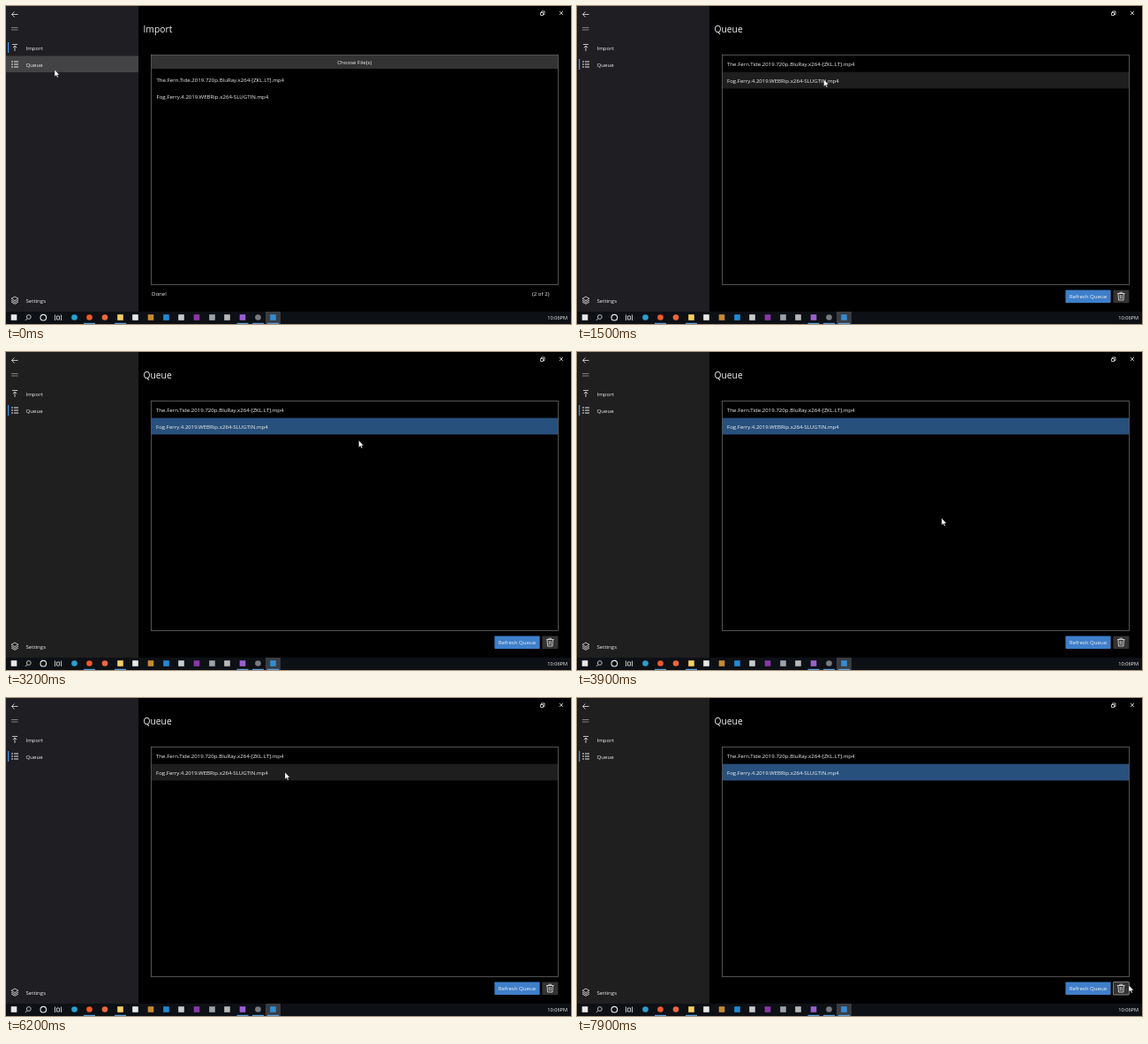
These frames come from a looping animation (640 by 360 pixels, 8000 ms). An HTML page:

```html
<!DOCTYPE html>
<html lang="en">
<head>
<meta charset="utf-8">
<title>Queue</title>
<style>
html, body { margin: 0; width: 100%; height: 100%; overflow: hidden; background: #000; }
svg { display: block; width: 640px; height: 360px; }
text { font: 6.1px "Open Sans", "Noto Sans", sans-serif; fill: #f2f2f2; }
.title { font-size: 10.3px; }
.mid { text-anchor: middle; }
.line { fill: none; stroke: #e8e8e8; stroke-width: .8; }
</style>
</head>
<body>
<svg viewBox="0 0 640 360">
  <rect width="640" height="360"/>

  <!-- sidebar -->
  <rect id="side" width="150" height="346"/>
  <rect id="navHover" y="56.5" width="150" height="18.5"/>
  <rect id="mark" x="2" width="1.2" height="12" fill="#4a8fe0"/>
  <path class="line" d="M13.500 9.500H6.500M9.500 6.500L6.500 9.500L9.500 12.500"/>
  <path class="line" stroke-opacity=".6" d="M6 24.500H13.500M6 27H13.500"/>
  <path class="line" d="M7 43.500H13M10 51V45M7.800 47.200L10 45L12.200 47.200"/>
  <path class="line" d="M6 63H8M6 66H8M6 69H8M9 63H14M9 66H14M9 69H14" style="stroke-width:1.2"/>
  <path class="line" d="M10 329L14 331.300L10 333.600L6 331.300ZM6 333.200L10 335.500L14 333.200M6 335L10 337.300L14 335"/>
  <text x="22.500" y="49.700">Import</text>
  <text x="22.500" y="68.700">Queue</text>
  <text x="22.500" y="335.500">Settings</text>

  <!-- window buttons -->
  <path class="line" d="M605.500 7.500H608.500V10.500H605.500ZM606.500 7.500V6H610V9.500H608.500M627 6L631 10M631 6L627 10"/>

  <g id="importPage">
    <text class="title" x="155.500" y="29.700">Import</text>
    <rect x="165" y="56" width="460" height="15" fill="#333"/>
    <rect class="line" x="164.500" y="55.500" width="461" height="260" style="stroke:#666"/>
    <text class="mid" x="394.700" y="65.700">Choose File(s)</text>
    <text class="file0" x="170.500" y="86"></text>
    <text class="file1" x="170.500" y="104.600"></text>
    <text x="165" y="327.800">Done!</text>
    <text x="615.500" y="327.800" text-anchor="end">(2 of 2)</text>
  </g>

  <g id="queuePage">
    <text class="title" x="155.500" y="29.700">Queue</text>
    <rect id="row0" x="165" y="56" width="460" height="18.700"/>
    <rect id="row1" x="165" y="74.700" width="460" height="18.700"/>
    <rect class="line" x="164.500" y="55.500" width="461" height="260" style="stroke:#666"/>
    <text class="file0" x="170" y="68.200"></text>
    <text class="file1" id="second" x="170" y="87"></text>
    <rect id="refresh" x="553.400" y="321.400" width="51.200" height="14.600" rx=".8" fill="#3f7fca"/>
    <text class="mid" x="579" y="331">Refresh Queue</text>
    <rect id="trash" x="607.400" y="321.400" width="18" height="14.600" rx=".8" fill="#333"/>
    <path class="line" d="M612 325.500H620.500M614.800 325.500V324.200H617.700V325.500M613 325.500L613.500 333H619L619.500 325.500M615.300 327V331.500M617.200 327V331.500"/>
  </g>

  <!-- taskbar -->
  <rect y="346" width="640" height="14" fill="#0d1015"/>
  <g id="bar"></g>
  <circle class="line" cx="25.800" cy="352" r="2.400"/>
  <path class="line" d="M24 353.800L21.800 356"/>
  <circle class="line" cx="42.300" cy="352.700" r="3.300" style="stroke-width:1.100"/>
  <path class="line" d="M55.500 349.500V356M57.500 351H60.500V355H57.500ZM62.500 349.500V356"/>
  <text x="636" y="354.800" text-anchor="end" style="font-size:5.600px">10:06PM</text>

  <path id="cursor" d="M0 0V8L1.800 6.300L3 9L4.300 8.400L3.100 5.900H5.500Z" fill="#fff" stroke="#111" stroke-width=".4"/>
</svg>
<script>
const el = id => document.getElementById(id);
const paint = (id, attrs) => {
  for (const name in attrs) el(id).setAttribute(name, attrs[name]);
};

const files = [
  "The.Fern.Tide.2019.720p.BluRay.x264-[ZKL.LT].mp4",
  "Fog.Ferry.4.2019.WEBRip.x264-SLUGTIN.mp4"
];
files.forEach((name, i) =>
  document.querySelectorAll(".file" + i).forEach(node => node.textContent = name));

// Taskbar icons: x, colour, round, running
const icons = [
  [9, "#e8e8e8"], [77.5, "#2a9fd0", 1], [94.5, "#f0592b", 1, 1], [112, "#f0663c", 1],
  [129.5, "#f3cf62", 0, 1], [146.5, "#e8e8e8"], [164, "#c58a35"], [181.5, "#2489d0"],
  [198.5, "#c8ccd0"], [216, "#8d35a8"], [233.5, "#9ca3aa"], [250.5, "#b8b8b8"],
  [268, "#9a5fd0", 0, 1], [285.5, "#777b80", 1, 1], [302.5, "#348bd0", 0, 1]
];
el("bar").innerHTML = '<rect x="294" y="346" width="17" height="14" fill="#383d43"/>' +
  icons.map(([x, fill, round, running]) =>
    `<rect x="${x - 3.3}" y="349.2" width="6.600" height="6.600" rx="${round ? 3.3 : 0}" fill="${fill}"/>` +
    (running ? `<rect x="${x - 6.5}" y="358.800" width="13" height="1.200" fill="#5d9fdc"/>` : "")
  ).join("");

// Pointer path: time, x, y
const path = [
  [0, 55, 72], [900, 55, 72], [1400, 260, 82], [1800, 385, 89], [2100, 396, 91],
  [2700, 396, 91], [2900, 398, 90], [3100, 398, 90], [3600, 413, 186], [3900, 413, 188],
  [4100, 413, 188], [4800, 570, 325], [5000, 572, 328], [5200, 572, 328],
  [5700, 332, 74], [6000, 318, 83], [6200, 316, 84], [6800, 316, 84],
  [7400, 600, 247], [7500, 600, 247], [7700, 620, 322], [7900, 625, 325], [8000, 625, 325]
];

function pointer(t) {
  const i = path.findIndex(p => p[0] > t);
  const [t0, x0, y0] = path[i - 1], [t1, x1, y1] = path[i];
  const u = (t - t0) / (t1 - t0), k = u * u * (3 - 2 * u);
  return [x0 + (x1 - x0) * k, y0 + (y1 - y0) * k];
}

function draw(t) {
  const [x, y] = pointer(t);
  const over = (l, top, r, b) => x >= l && x < r && y >= top && y < b;
  const onQueue = t >= 200;
  const selected = t >= 2000 && t < 4900 || t >= 6500;
  const pressed = t >= 2000 && t < 2200 || t >= 6500 && t < 6700;
  const hover = [over(165, 56, 625, 74.7), over(165, 74.7, 625, 93.4)];

  paint("cursor", { transform: `translate(${x} ${y})` });
  paint("side", { fill: t >= 3200 && t < 6000 || t >= 6900 ? "#1f1f1f" : "#1f1e23" });
  paint("navHover", { fill: over(0, 56, 150, 75) ? (onQueue ? "#343438" : "#434346") : "none" });
  paint("mark", { y: onQueue ? 60 : 41 });

  const enter = Math.min(1, Math.max(0, (t - 100) / 400));
  paint("importPage", { visibility: onQueue ? "hidden" : "visible" });
  paint("queuePage", {
    visibility: onQueue ? "visible" : "hidden",
    opacity: Math.min(1, enter * 2),
    transform: `translate(0 ${24 * (1 - enter) ** 3})`
  });

  paint("row0", { fill: hover[0] ? "#1e1e1e" : "none" });
  paint("row1", {
    fill: selected ? (hover[1] ? "#3269a5" : "#28507c") : hover[1] ? "#1e1e1e" : "none"
  });
  paint("second", { x: pressed ? 169.4 : 170 });
  paint("refresh", { stroke: over(553, 321, 605, 336) ? "#8fbdf0" : "none" });
  paint("trash", { stroke: over(607, 321, 626, 336) ? "#858585" : "none" });
}

function frame() {
  draw(Math.floor(performance.now() % 8000 / 100) * 100);
  requestAnimationFrame(frame);
}
frame();
</script>
</body>
</html>
```
